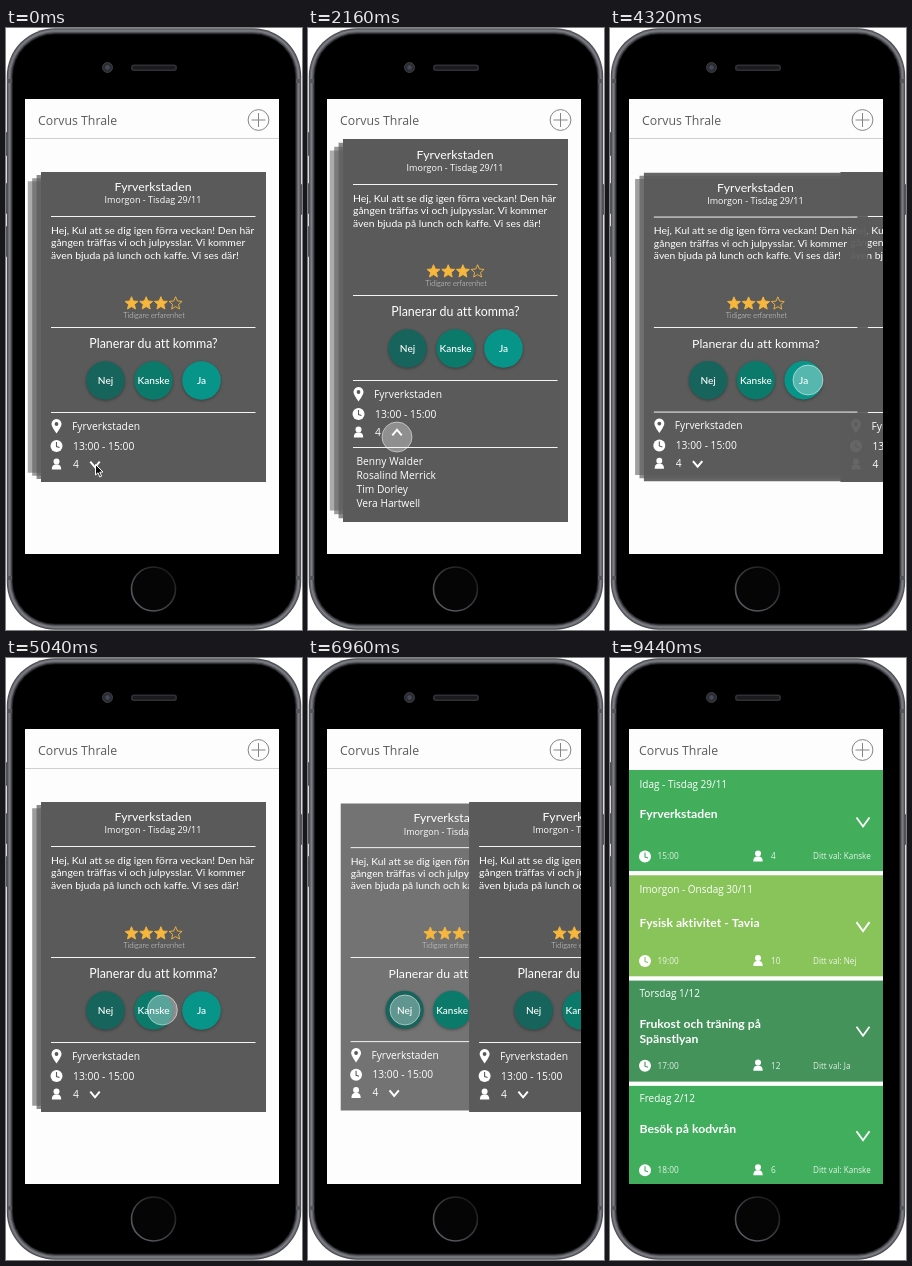
An HTML page with a canvas for the animation above (9.52 s loop, 296 px wide and 602 px high).

```html
<!DOCTYPE html>
<html lang="sv">
<head>
<meta charset="utf-8">
<title>Inbjudningar</title>
<style>
  html, body { margin: 0; width: 100%; height: 100%; overflow: hidden; background: #fff; }
  canvas { display: block; width: 296px; height: 602px; }
</style>
</head>
<body>
<canvas id="stage"></canvas>
<script>
const W = 296, H = 602, LOOP = 9520, STEP = 80;
const dpr = window.devicePixelRatio || 1;

function setup(canvas) {
  canvas.width = W * dpr;
  canvas.height = H * dpr;
  const c = canvas.getContext('2d');
  c.scale(dpr, dpr);
  c.letterSpacing = '0.01px'; // keeps letter pairs unjoined
  return c;
}

const stage = setup(document.getElementById('stage'));
const listLayer = document.createElement('canvas');
let ctx = stage;

const LATO = 'Lato, sans-serif';
const OPEN = '"Open Sans", sans-serif';
const USER = 'Corvus Thrale';
const PLACE = 'Fyrverkstaden';
const GUESTS = ['Benny Walder', 'Rosalind Merrick', 'Tim Dorley', 'Vera Hartwell'];
const SCREEN = { x: 19, y: 71, w: 254, h: 455 };
const CARD = { x: 35, y: 144, w: 225, h: 310, color: '90,90,90' };
const SWIPES = [4050, 5408, 6764, 8300];
const SWIPE_DIST = 260, SWIPE_MS = 400;

const EVENTS = [
  { date: 'Idag - Tisdag 29/11', title: [PLACE], at: 43.5, time: '15:00', count: 4, reply: 'Kanske', color: '#42ae5c' },
  { date: 'Imorgon - Onsdag 30/11', title: ['Fysisk aktivitet - Tavia'], at: 48, time: '19:00', count: 10, reply: 'Nej', color: '#89c45b' },
  { date: 'Torsdag 1/12', title: ['Frukost och träning på', 'Spänstlyan'], at: 44, time: '17:00', count: 12, reply: 'Ja', color: '#43935a' },
  { date: 'Fredag 2/12', title: ['Besök på kodvrån'], at: 44, time: '18:00', count: 6, reply: 'Kanske', color: '#41ae5e' }
];

// time, x, y
const POINTER = [
  [0, 89, 440], [1500, 89, 440], [2000, 89, 409], [2950, 89, 409],
  [3700, 198, 352], [4500, 198, 352], [5200, 150, 352], [5960, 150, 352],
  [6560, 97, 352], [7740, 97, 352], [8080, 150, 352], [LOOP, 150, 352]
];

const clamp = v => Math.max(0, Math.min(1, v));
const mix = (a, b, p) => a + (b - a) * p;
const ease = (t, start, ms) => {
  const u = clamp((t - start) / ms);
  return u * u * (3 - 2 * u);
};

function text(str, x, y, size, family, { weight = 400, align = 'left', color = '#fff' } = {}) {
  ctx.font = `${weight} ${size}px ${family}`;
  ctx.textAlign = align;
  ctx.fillStyle = color;
  ctx.fillText(str, x, y + size * 0.36);
}

function disc(x, y, r, fill, stroke, width = 1) {
  ctx.beginPath();
  ctx.arc(x, y, r, 0, Math.PI * 2);
  if (fill) { ctx.fillStyle = fill; ctx.fill(); }
  if (stroke) { ctx.strokeStyle = stroke; ctx.lineWidth = width; ctx.stroke(); }
}

function roundRect(x, y, w, h, r, fill) {
  ctx.beginPath();
  ctx.roundRect(x, y, w, h, r);
  ctx.fillStyle = fill;
  ctx.fill();
}

function path(points, color, width) {
  ctx.beginPath();
  points.forEach(([x, y]) => ctx.lineTo(x, y));
  ctx.strokeStyle = color;
  ctx.lineWidth = width;
  ctx.stroke();
}

const chevron = (x, y, w, h, width) =>
  path([[x - w, y - h], [x, y + h], [x + w, y - h]], '#fff', width);

function clock(x, y, hands) {
  disc(x, y, 6, '#fff');
  path([[x, y - 4], [x, y + 0.5], [x + 3, y + 1.5]], hands, 1.1);
}

function person(x, y) {
  disc(x, y - 2.6, 3, '#fff');
  ctx.beginPath();
  ctx.moveTo(x - 4.7, y + 5.5);
  ctx.quadraticCurveTo(x - 4.7, y + 1, x - 1.5, y + 0.5);
  ctx.lineTo(x + 1.5, y + 0.5);
  ctx.quadraticCurveTo(x + 4.7, y + 1, x + 4.7, y + 5.5);
  ctx.fill();
}

function pin(x, y) {
  ctx.beginPath();
  ctx.arc(x, y - 2, 5, Math.PI * 0.9, Math.PI * 2.1);
  ctx.quadraticCurveTo(x + 3.5, y + 3, x, y + 7.5);
  ctx.quadraticCurveTo(x - 3.5, y + 3, x - 4.75, y - 0.5);
  ctx.fillStyle = '#fff';
  ctx.fill();
  disc(x, y - 2, 1.9, '#595959');
}

function star(x, y, filled) {
  ctx.beginPath();
  for (let i = 0; i < 10; i++) {
    const a = i * Math.PI / 5 - Math.PI / 2, r = i % 2 ? 3.1 : 6.8;
    ctx.lineTo(x + r * Math.cos(a), y + r * Math.sin(a));
  }
  ctx.closePath();
  ctx.fillStyle = ctx.strokeStyle = '#f6b73c';
  ctx.lineWidth = 0.9;
  ctx.lineJoin = 'round';
  if (filled) ctx.fill();
  ctx.stroke();
  ctx.lineJoin = 'miter';
}

function button(label, x, color) {
  ctx.save();
  ctx.shadowColor = 'rgba(0,0,0,.35)';
  ctx.shadowBlur = 3 * dpr;
  ctx.shadowOffsetY = dpr;
  disc(x, 352.5, 19.3, color);
  ctx.restore();
  text(label, x, 352.5, 10.1, LATO, { weight: 500, align: 'center' });
}

// Content uses the coordinates of the collapsed card
function cardContent(open) {
  const mid = { align: 'center' };
  const rule = y => path([[45, y], [249.5, y]], '#f4f4f4', 1);
  text(PLACE, 147, 158.5, 12.3, LATO, mid);
  text('Imorgon - Tisdag 29/11', 147, 172, 9, OPEN, mid);
  ['Hej, Kul att se dig igen förra veckan! Den här',
   'gången träffas vi och julpysslar. Vi kommer',
   'även bjuda på lunch och kaffe. Vi ses där!'
  ].forEach((line, i) => text(line, 45, 202 + i * 12.4, 10.4, LATO));
  for (let i = 0; i < 4; i++) star(125.5 + i * 14.7, 275.5, i < 3);
  text('Tidigare erfarenhet', 148, 287.5, 7.5, LATO, { weight: 300, align: 'center', color: '#ddd' });
  text('Planerar du att komma?', 147.5, 315.5, 12.4, LATO, mid);
  button('Nej', 99.5, '#17645c');
  button('Kanske', 147.5, '#0b7a6b');
  button('Ja', 195.5, '#07958a');
  [188.5, 299.5, 384.5].forEach(rule);
  pin(50.5, 398);
  clock(50.5, 418, '#595959');
  person(50.5, 436);
  text(PLACE, 66, 398, 10.3, OPEN);
  text('13:00 - 15:00', 67, 418, 10.3, OPEN);
  text('4', 67, 436, 10.3, OPEN);
  chevron(89, 436.5, 4.7, mix(2.8, -2.8, open), 2);
  if (open > 0) {
    ctx.globalAlpha = open;
    rule(451.5);
    GUESTS.forEach((name, i) => text(name, 48.5, 465.5 + i * 14, 10.2, OPEN));
    ctx.globalAlpha = 1;
  }
}

function card(depth, dx, open, withContent) {
  const h = CARD.h + 73 * open;
  const top = CARD.y - 33 * open;
  const scale = 1 - 0.02 * depth;
  const alpha = depth < 1 ? 1 - 0.3 * depth : 0.8 - 0.1 * depth;
  ctx.save();
  ctx.translate(CARD.x - 4.4 * depth + dx, top + h * (1 - scale) / 2);
  ctx.scale(scale, scale);
  ctx.beginPath();
  ctx.rect(0, 0, CARD.w, h);
  ctx.fillStyle = `rgba(${CARD.color},${alpha})`;
  ctx.fill();
  if (withContent) {
    ctx.clip();
    ctx.translate(-CARD.x, open - CARD.y);
    cardContent(open);
  }
  ctx.restore();
}

function stack(t, open) {
  const moves = SWIPES.map(s => ease(t, s, SWIPE_MS));
  const front = moves.filter(p => p > 0).length;
  const shift = moves.reduce((a, b) => a + b, 0);
  const leaving = front ? moves[front - 1] : 1;
  const drawLeaving = () => card(0, leaving * SWIPE_DIST, 0, true);

  for (let i = SWIPES.length - 1; i > front; i--) card(i - shift, 0, open, false);
  // The leaving card drops behind the next one halfway out
  if (leaving > 0.55 && leaving < 1) drawLeaving();
  if (front < SWIPES.length) card(front - shift, 0, open, true);
  if (leaving <= 0.55) drawLeaving();
}

function list() {
  const soft = { color: 'rgba(255,255,255,.85)' };
  ctx.fillStyle = '#fdfdfd';
  ctx.fillRect(SCREEN.x, 110, SCREEN.w, 416);
  EVENTS.forEach((e, i) => {
    const y = 112.5 + i * 104.6;
    ctx.fillStyle = e.color;
    ctx.fillRect(SCREEN.x, 112 + i * 105.3, SCREEN.w, 101);
    text(e.date, 29.5, y + 14, 10, OPEN);
    e.title.forEach((line, n) => text(line, 29.5, y + e.at + n * 15, 12.2, LATO, { weight: 700 }));
    chevron(253, y + 51.5, 6.5, 4.5, 1.8);
    clock(35, y + 86, e.color);
    person(148, y + 85.5);
    text(e.time, 47.5, y + 86, 8.3, OPEN, soft);
    text(String(e.count), 161, y + 86, 8.3, OPEN, soft);
    text('Ditt val: ' + e.reply, 203, y + 86, 8.1, OPEN, soft);
  });
}

function pointer(t) {
  if (t < STEP) {
    ctx.beginPath();
    [[89.5, 436.5], [89.5, 447], [92, 444.8], [93.8, 449], [95.6, 448.2], [93.8, 444.2], [97, 444]]
      .forEach(([x, y]) => ctx.lineTo(x, y));
    ctx.closePath();
    ctx.fillStyle = '#111';
    ctx.strokeStyle = '#fff';
    ctx.lineWidth = 1;
    ctx.fill();
    ctx.stroke();
    return;
  }
  const i = POINTER.findIndex(k => k[0] > t);
  const [t0, x0, y0] = POINTER[i - 1], [t1, x1, y1] = POINTER[i];
  const p = ease(t, t0, t1 - t0);
  ctx.globalAlpha = 1 - ease(t, 8420, 240);
  disc(mix(x0, x1, p), mix(y0, y1, p), 15, 'rgba(255,255,255,.32)', 'rgba(255,255,255,.5)');
  ctx.globalAlpha = 1;
}

function phone() {
  ctx.fillStyle = '#fff';
  ctx.fillRect(0, 0, W, H);
  [[0, 104, 24], [0, 155, 31], [0, 198, 31], [293, 156, 31]]
    .forEach(([x, y, h]) => roundRect(x, y, 3, h, 1, '#55565b'));
  // Metal rim, from the outside in
  ['#4b4c51', '#66676d', '#808188', '#6c6d73', '#48494e', '#242427', '#000'].forEach((color, i) => {
    const d = 0.8 + i;
    roundRect(d, d - 0.5, W - 2 * d, H + 1 - 2 * d, 48 - i, color);
  });
  ctx.fillStyle = '#55565b';
  [51, 548].forEach(y => {
    ctx.fillRect(1, y, 5, 4);
    ctx.fillRect(290, y, 5, 4);
  });
  disc(101.5, 39.5, 5, '#2c2d31', '#3c3d42');
  disc(101.5, 39.5, 2.2, '#44495c');
  roundRect(125, 36.5, 46, 6.5, 3.2, '#303135');
  roundRect(126.5, 38, 43, 3.5, 1.7, '#1b1b1e');
  const ring = ctx.createLinearGradient(132, 577, 163, 545);
  ring.addColorStop(0, '#5a5b60');
  ring.addColorStop(1, '#1c1c1f');
  disc(147.5, 561, 22, '#050505', ring, 1.6);
}

function header(listed, open) {
  text(USER, mix(32, 29, listed), 92.5, 12.3, OPEN, { color: '#5c5c5c' });
  disc(252.5, 92, 10.4, null, '#858585');
  path([[245.5, 92], [259.5, 92]], '#858585', 1);
  path([[252.5, 85], [252.5, 99]], '#858585', 1);
  ctx.globalAlpha = 1 - open;
  path([[19, 110.5], [273, 110.5]], '#cfcfcf', 1);
  ctx.globalAlpha = 1;
}

function draw(t) {
  const open = ease(t, 1200, 400) - ease(t, 2720, 400);
  const listed = ease(t, 8420, 440);
  phone();
  ctx.save();
  ctx.beginPath();
  ctx.rect(SCREEN.x, SCREEN.y, SCREEN.w, SCREEN.h);
  ctx.clip();
  ctx.fillStyle = '#fdfdfd';
  ctx.fillRect(SCREEN.x, SCREEN.y, SCREEN.w, SCREEN.h);
  header(listed, open);
  stack(t, open);
  if (listed > 0) {
    ctx.globalAlpha = listed;
    ctx.drawImage(listLayer, 0, 0, W, H);
    ctx.globalAlpha = 1;
  }
  pointer(t);
  ctx.restore();
}

function tick() {
  const t = performance.now() % LOOP;
  draw(Math.floor(t / STEP) * STEP);
  requestAnimationFrame(tick);
}

ctx = setup(listLayer);
list();
ctx = stage;
tick();
</script>
</body>
</html>
```
